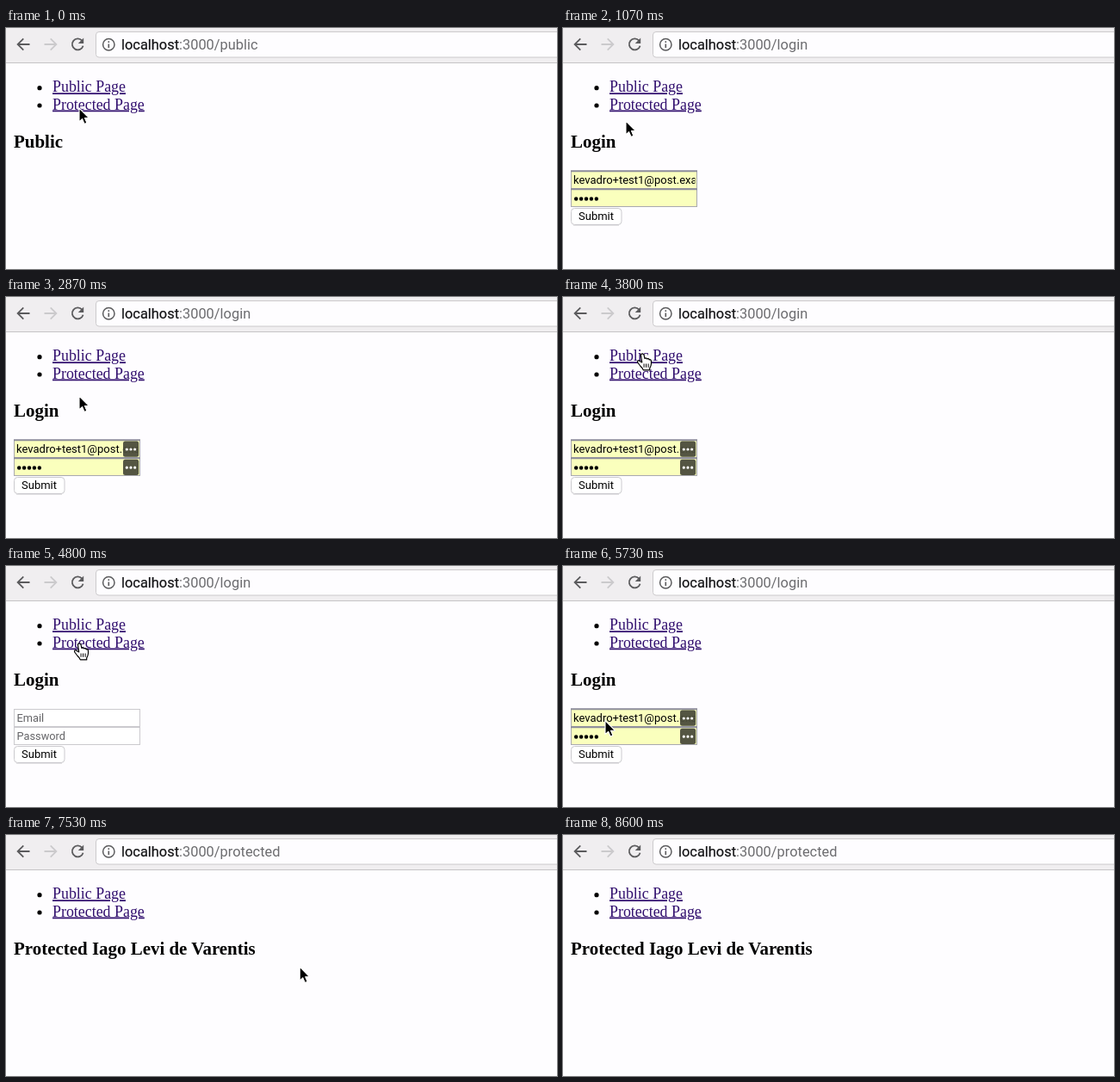
Recreate the animation shown at these times as an HTML page. Size 640 by 280 pixels, loop 8670 ms.

```html
<!DOCTYPE html>
<html lang="en">
<head>
<meta charset="utf-8">
<title>Protected route demo</title>
<style>
  html, body { margin: 0; width: 100%; height: 100%; overflow: hidden; background: #fefdff; }
  svg { display: block; width: 640px; height: 280px; }
  text { white-space: pre; }
  .ui { font: 13px Roboto, "Open Sans", sans-serif; }
  .url { font: 16.4px Roboto, "Open Sans", sans-serif; fill: #6c6c6f; }
  .host { fill: #161618; stroke: #161618; stroke-width: .25; }
  .link { font: 17.9px "Liberation Serif", Times, serif; fill: #32106f; text-decoration: underline; }
  .link.active { fill: #d8141c; }
  .head { font: bold 20.94px "Liberation Serif", Times, serif; }
  .icon { fill: none; stroke: #5b5b5d; stroke-width: 1.8; }
  .field { fill: #fff; stroke: #cbcace; }
  .filled .field { fill: #faffbd; stroke: #a9a9b0; }
  .edge, .value, .badges { display: none; }
  .filled .edge, .filled .value, .badged .badges { display: inline; }
  .filled .hint { display: none; }
  .hint { font-size: 12.8px; fill: #646467; }
  .button rect { fill: #fff; stroke: #cbcace; }
  .button.active rect { fill: url(#press); stroke: #2a6fd8; }
  .button.active text { fill: #fff; }
</style>
</head>
<body>
<svg viewBox="0 0 640 280">
  <defs>
    <linearGradient id="press" x2="0" y2="1">
      <stop stop-color="#6cb0fa"/><stop offset="1" stop-color="#1d70f2"/>
    </linearGradient>
    <clipPath id="clip"><rect x="10" y="166" width="143.5" height="21"/></clipPath>
    <g id="badge">
      <rect x="136" y="167.5" width="18.2" height="18.2" rx="2.5" fill="#4b4c3b" opacity=".95"/>
      <path d="M140.3 177h10" stroke="#fff" stroke-width="3.2" stroke-linecap="round" stroke-dasharray="0 4.7"/>
    </g>
  </defs>

  <rect width="640" height="280" fill="#fefdff"/>
  <rect width="640" height="40" fill="#f0eef0"/>
  <path d="M0 40.5H640" stroke="#c6c4c6"/>
  <rect x="104.5" y="4.5" width="560" height="29.5" rx="3.5" fill="#fefdff" stroke="#cccacc"/>
  <path class="icon" d="M27.5 19H14M20.3 12.3 13.6 19l6.7 6.7"/>
  <path class="icon" d="M44.5 19H58M51.7 12.3 58.4 19l-6.7 6.7" style="stroke:#cbcacc"/>
  <path class="icon" d="M88.3 14.6A6.5 6.5 0 1 0 89.6 20.8"/>
  <path d="M90.2 11.6V18H83.8Z" fill="#5b5b5d"/>
  <circle class="icon" cx="119.3" cy="19.3" r="6.7" style="stroke-width:1.5"/>
  <path d="M119.3 18.4V23M119.3 15.3V17" stroke="#5b5b5d" stroke-width="1.6"/>
  <text class="url" x="134" y="25.3"><tspan class="host">localhost</tspan>:3000/<tspan id="path">public</tspan></text>

  <circle cx="39" cy="69.7" r="2.6"/>
  <circle cx="39" cy="90" r="2.6"/>
  <text class="link" id="pub" x="54" y="74.3">Public Page</text>
  <text class="link" id="prot" x="54" y="94.5">Protected Page</text>
  <text class="head" id="head" x="9" y="139.2">Public</text>

  <g class="ui" id="form">
    <rect class="field" x="9.5" y="166.5" width="146" height="20"/>
    <rect class="field" x="9.5" y="187.5" width="146" height="20"/>
    <path class="edge" d="M9 166.2H156M9 187.3H156" stroke="#8d8d9b" stroke-width="2"/>
    <g class="hint"><text x="12.5" y="181">Email</text><text x="12.5" y="202">Password</text></g>
    <g class="value">
      <text x="12" y="181.2" clip-path="url(#clip)">kevadro+test1@post.example</text>
      <path d="M15.2 198.5h25" stroke="#000" stroke-width="4.5" stroke-linecap="round" stroke-dasharray="0 5.9"/>
    </g>
    <g class="badges"><use href="#badge"/><use href="#badge" y="21.2"/></g>
    <g class="button" id="submit">
      <path d="M12 229H65" stroke="#c9c8cb"/>
      <rect x="9.5" y="209.5" width="58.5" height="19" rx="4"/>
      <text x="18" y="223.3">Submit</text>
    </g>
  </g>

  <g id="cursor" stroke-linejoin="round">
    <path id="arrow" d="M0 0V16L3.6 12.7 6.1 18.4 8.9 17.2 6.5 11.6H11.4Z" fill="#000" stroke="#fff" stroke-width="1.1"/>
    <g id="hand" stroke="#000" stroke-width="1.2" transform="translate(-.7 -.5)">
      <path d="M-1.9 1.6Q0-.9 1.7 1.6L2.6 6Q4 4.6 5.2 6.4 7 5.4 7.9 7.4 10 6.6 10.2 9.2V12Q10 15 8.4 17.3V19.4H1Q.2 17-2.2 15L-5.6 10.5Q-6.2 8-4 8.4L-.6 10.4Z" fill="#fff"/>
      <path d="M1.8 12V16.3M4.3 12V16.3M6.8 12V16.3" stroke-width="1"/>
    </g>
  </g>
</svg>
<script>
  const LOOP = 8670, FPS = 15;
  const HOLD = 135, FILL = 70, BADGE = 600, HIDE = 8520;
  const $ = id => document.getElementById(id);
  const titles = { public: "Public", login: "Login", protected: "Protected Iago Levi de Varentis" };

  // What is pressed, when, and the page that opens on release
  const clicks = [
    { at: 530, on: "prot", page: "login" },
    { at: 1930, on: "submit" },
    { at: 3860, on: "pub", page: "public" },
    { at: 4660, on: "prot", page: "login" },
    { at: 6130, on: "submit" },
    { at: 6660, on: "prot", page: "protected" }
  ];

  // Pointer moves: start, end, x, y; it rests in between
  const moves = [
    [930, 1070, 73, 108], [1070, 1800, 38, 220], [2470, 2870, 85, 115],
    [2870, 3460, 93, 66], [4200, 4530, 86, 90], [5200, 6000, 36, 211],
    [6270, 6600, 90, 93], [6930, 7470, 361, 154], [7470, 7800, 156, 146],
    [7800, 8130, 438, 176], [8200, 8400, 496, 172]
  ];

  const show = (el, on) => el.style.display = on ? "" : "none";
  const ease = k => k * k * (3 - 2 * k);

  function pointer(t) {
    let x = 85, y = 93;
    for (const [from, to, nx, ny] of moves) {
      const k = ease(Math.min(1, Math.max(0, (t - from) / (to - from))));
      x += (nx - x) * k;
      y += (ny - y) * k;
    }
    return [x, y];
  }

  function drawPage(t) {
    const last = clicks.filter(c => c.page && c.at + HOLD <= t).pop();
    const page = last ? last.page : "public";
    const age = last ? t - last.at - HOLD : 0;
    $("path").textContent = page;
    $("head").textContent = titles[page];
    show($("form"), page === "login");
    $("form").classList.toggle("filled", age >= FILL);
    $("form").classList.toggle("badged", age >= BADGE);
    for (const id of ["pub", "prot", "submit"]) {
      const down = clicks.some(c => c.on === id && t >= c.at && t < c.at + HOLD);
      $(id).classList.toggle("active", down);
    }
  }

  function drawCursor(t) {
    const [x, y] = pointer(t);
    const onLink = t > 0 && x > 54 && y > 59 && y < 97 && x < (y < 79 ? 139 : 161);
    $("cursor").setAttribute("transform", `translate(${x.toFixed(1)} ${y.toFixed(1)})`);
    show($("cursor"), t < HIDE);
    show($("hand"), onLink);
    show($("arrow"), !onLink);
  }

  const start = performance.now();
  function tick() {
    const now = (performance.now() - start) % LOOP;
    const t = Math.floor(now * FPS / 1000 + .05) * 1000 / FPS;
    drawPage(t);
    drawCursor(t);
    requestAnimationFrame(tick);
  }
  tick();
</script>
</body>
</html>
```
